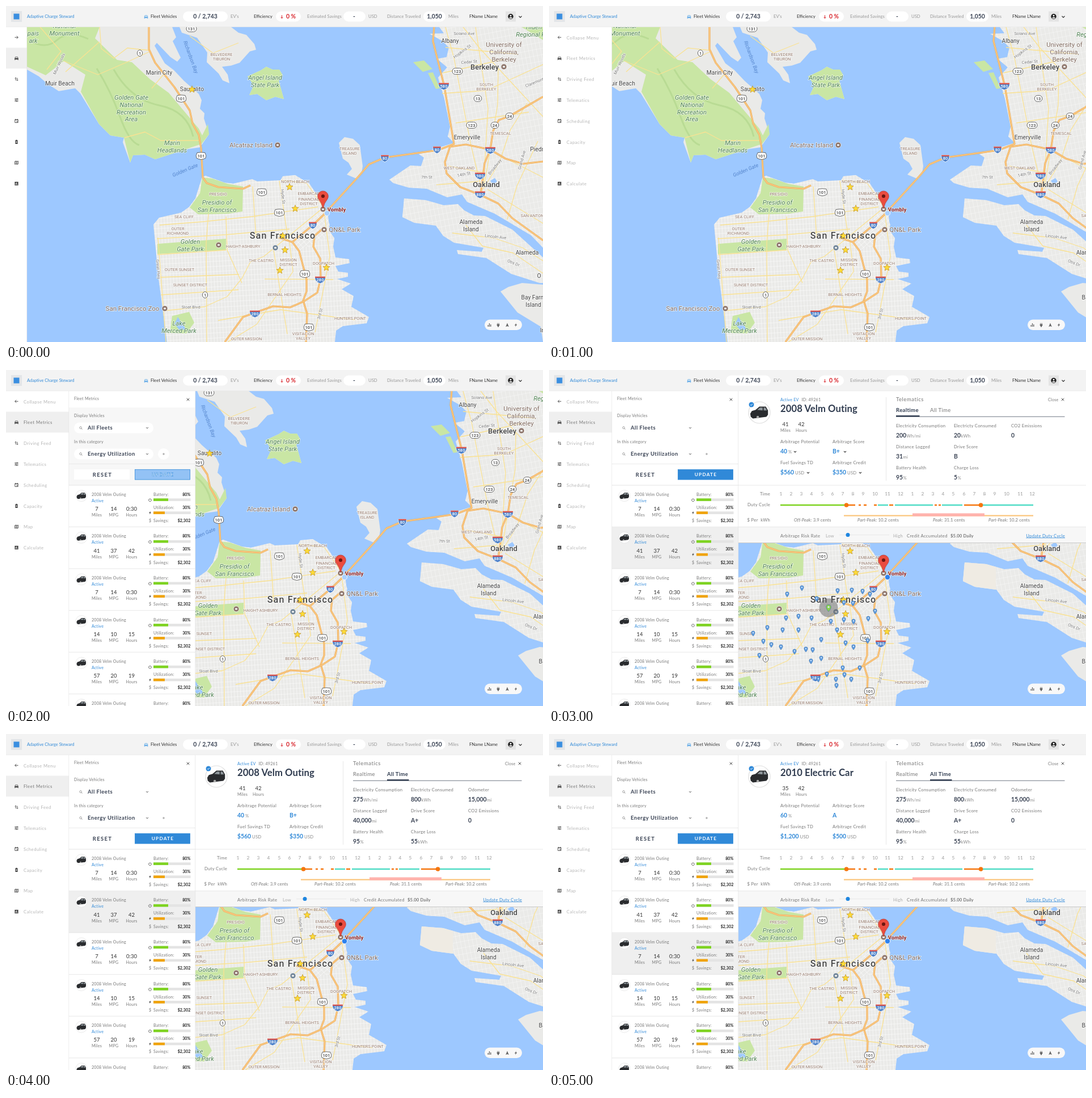
These frames come from a looping animation (947 by 592 pixels, 6000 ms). An HTML page:

```html
<!DOCTYPE html>
<html lang="en">
<head>
<meta charset="utf-8">
<title>Fleet dashboard</title>
<style>
html, body { margin: 0; width: 100%; height: 100%; overflow: hidden }
svg { display: block; width: 100vw; height: 100vh }
text { font: 7.7px Lato, sans-serif; letter-spacing: .3px; fill: #777; white-space: pre }
.mid { text-anchor: middle } .end { text-anchor: end }
.head { letter-spacing: 0; fill: #999 }
.dark { fill: #333 } .blue { fill: #3089d8 } .pale { fill: #aaa }
.card { font-size: 7.1px; letter-spacing: .25px }
.pct { font-size: 7.1px; letter-spacing: .1px; font-weight: 700; fill: #222 }
.num { font-size: 9.5px; letter-spacing: 0; fill: #333 }
.value { font-size: 10.4px; letter-spacing: 0; font-weight: 700; fill: #3a4354 }
.value tspan { font-size: 7.7px; font-weight: 400; fill: #888; letter-spacing: .2px }
.value.blue { fill: #3089d8 }
.name { font-size: 16.6px; letter-spacing: .1px; font-weight: 700; fill: #2f3b4f }
.field { font-size: 9.5px; letter-spacing: .5px; font-weight: 700; fill: #3a4354 }
.tab { font-size: 9.5px; letter-spacing: .35px }
.on { font-weight: 700; fill: #2f3b4f }
.nav { letter-spacing: .5px; fill: #b4b4b4 } .now { fill: #777 }
#map text { font-family: Roboto, sans-serif; letter-spacing: 0; text-anchor: middle; fill: #444;
  stroke: #fff; stroke-width: 1.6px; stroke-opacity: .75; paint-order: stroke }
#map .city { font-size: 13px; font-weight: 500 }
#map .metro { font-size: 16px; font-weight: 500; letter-spacing: 1.2px }
#map .town { font-size: 10.3px }
#map .place { font-size: 11.5px; fill: #806a5f }
#map .park { font-size: 11.3px; font-style: italic; fill: #4d8150 }
#map .area { font-size: 7.4px; fill: #94796b }
#map .road { font-size: 7.5px; fill: #777 }
#map .sea { font-size: 9px; font-style: italic; fill: #5585cc; stroke: none }
#map .sign { font-size: 7.5px; font-weight: 500; stroke: none }
#map .inter { fill: #fff }
#map .pinned { font-size: 9.6px; font-weight: 700; fill: #8f1f1b }
</style>
</head>
<body>
<svg viewBox="0 0 947 592" preserveAspectRatio="none"><g id="map"></g><g id="ui"></g></svg>
<script>
const $ = id => document.getElementById(id);
const text = (x, y, s, cls = '', style = '') => `<text x="${x}" y="${y}" class="${cls}" style="${style}">${s}</text>`;
const rect = (x, y, w, h, fill, more = '') => `<rect x="${x}" y="${y}" width="${w}" height="${h}" fill="${fill}" ${more}/>`;
const dot = (x, y, r, fill, more = '') => `<circle cx="${x}" cy="${y}" r="${r}" fill="${fill}" ${more}/>`;
const shape = (d, fill, more = '') => `<path d="${d}" fill="${fill}" ${more}/>`;
const line = (d, color, width = 1) => shape(d, 'none', `stroke="${color}" stroke-width="${width}" stroke-linejoin="round"`);
const at = (x, y, content, scale = 1) => `<g transform="translate(${x} ${y}) scale(${scale})">${content}</g>`;
const hline = (x1, x2, y, color, width) => line(`M${x1} ${y}H${x2}`, color, width);
const each = (list, draw) => list.map(draw).join('');

// ---- Map ----
const LAND = '#eaeae8', PARK = '#c9e6a4', WATER = '#9dc8ff';
const coast = {
  marin: 'M0 37V90L37 112 58 124 73 137 93 150 122 145 131 154 164 208 184 228 208 232 206 240 219 276 224 263 245 262 263 270 291 261 321 252 342 249 358 226 349 198 350 189 342 181 345 166 340 155 314 132 296 113 280 101 262 70 266 65 290 90 302 98 308 91 294 62 300 55 293 37Z',
  tiburon: 'M306 37L310 47 337 56 355 82 354 99 375 119 382 131 394 136 391 121 381 107 397 105 412 100 430 80 441 77 438 67 424 51 410 47 397 37Z',
  angel: 'M426 124L450 113 459 107 470 112 482 112 488 122 481 132 490 164 475 160 459 166 443 155 429 157 437 140Z',
  treasure: 'M587 241L597 231 612 234 624 245 629 282 627 295 620 305 601 297 610 287 604 276 594 269Z',
  city: 'M346 301L352 299 385 311 401 313 434 305 443 309 484 307 488 300 510 298 535 313 556 344 568 370 571 397 579 409 577 424 581 443 605 446 606 453 581 458 586 468 603 470 603 477 584 481 608 489 592 499 613 511 609 530 640 548 636 559 594 564 582 572 580 592H284L269 480 260 385 270 373 309 364 323 354 334 339Z',
  east: 'M764 37L772 48 747 49 770 62 781 73 777 90 760 93 778 108 762 126 773 163 783 213 779 230 790 241 728 261 737 267 732 282 713 281 676 306 683 312 710 320 742 322 778 337 804 332 813 345 862 366 904 391 926 404 947 426H1000V37Z',
  alameda: 'M702 339L740 342 772 351 797 349 808 360 825 369 845 370 893 394 947 443H1000V488H941L891 472 847 444 797 437 795 430 839 433 842 426 790 417 771 405 758 387 720 382 699 372Z',
  farm: 'M872 503L886 495 910 488 947 491H1000V592H947L943 565 902 540Z'
};
const parks = [
  'M0 37H165L157 57 196 95 222 99 254 129 287 153 340 216 346 228 356 208 358 226 345 243 291 261 263 270 245 262 224 263 219 276 208 232 184 228 164 208 132 151 140 121 102 97 70 122 0 90Z',
  'M346 302L364 304 390 313 418 318 417 362 392 366 339 367 324 355 342 330Z',
  'M267 419L388 410V430L267 437Z', 'M293 546L323 539 332 558 318 577 289 576Z',
  'M718 99L737 96 752 111 735 116Z', 'M744 118L753 117 765 145 758 146Z', 'M909 37H1000V91L961 82 947 60Z', coast.angel
];
const streets = [
  'M165 37L168 75 190 92 214 74 252 78M60 37L97 80 72 112M165 63L105 116M102 97L162 121 213 99 252 81M281 117L257 145M209 232L245 222 273 237 342 237M324 53L365 83 410 65',
  'M271 386L347 380 434 371 550 354M266 410L388 403 500 393M267 438L388 430M357 366L353 418 354 592M268 408L282 592M388 371L390 430 416 488M482 308L498 415M435 318L441 408',
  'M560 355L455 441 431 451 416 480 390 512 350 530 277 537M500 416L506 468 442 561 391 592M472 430L496 578M486 307L530 312 560 355 571 441 545 575M456 481L577 482M270 478L411 473M273 509L410 500M374 554L484 535 616 553',
  'M775 37L790 92 819 241 841 333M828 37L850 181 842 315M868 108L867 174 844 312M770 118L878 94M769 154L847 149 947 103M793 206L922 187M841 323L870 276 889 219 919 171M855 255L947 302M849 323L947 383M775 73L902 85',
  'M759 315L833 309M781 282L844 294M884 376L901 317 938 238M787 400L861 409 911 426 947 449M811 386L840 423 894 435 947 471M806 37L835 74 947 195'
];
const freeways = [
  'M252 37V76L263 100 297 143 324 184 329 207 340 227 344 250 347 302 354 312 374 319 418 322 431 316',
  'M560 368L622 300 640 279 668 267 762 254 790 243 773 142 753 62 755 37',
  'M560 368L541 386 505 416 517 432 530 481V503L524 519 531 542 529 592M505 416L481 408',
  'M560 391L544 405 542 424 554 445 555 479 549 505 526 520 501 531 471 529 440 540 418 548 386 592',
  'M783 248L811 244 854 253 881 269 912 278 947 274M854 253L844 277 837 332M783 248L774 275 777 295 801 319 837 333 868 348 893 374 947 413M854 253L859 220 869 201 888 194 947 160'
];

// Entries read "x y angle text"; "/" starts a new line and the angle may be left out.
const labels = {
  park: '221 165 Golden Gate/National/Recreation/Area|457 130 Angel Island/State Park|293 245 Marin/Headlands|372 350 Presidio of/San Francisco|325 419 Golden/Gate Park|305 563 Lake/Merced Park|103 39 National/Monument|48 52 pais/ark|930 41 Tilden/Regional Par',
  place: '432 249 Alcatraz Island|223 537 San Francisco Zoo|597 398 QN&amp;L Park|878 72 University of/California,/Berkeley',
  city: '847 319 Oakland|844 112 Berkeley',
  metro: '488 410 San Francisco',
  town: '783 65 Albany|813 235 Emeryville|270 121 Marin City|328 150 Sausalito|95 140 Muir Beach|820 384 Alameda/Island|919 438 Alameda|930 517 Bay Farm/Island|939 256 Piedm|940 479 O|946 575 In',
  area: '380 88 BELVEDERE/TIBURON|606 254 TREASURE/ISLAND|847 141 SOUTH/BERKELEY|799 288 WEST OAKLAND|872 227 TEMESCAL|510 312 NORTH BEACH|534 333 EMBARCAD|534 343 FINANCIAL/DISTRICT|374 334 PRESIDIO|314 374 SEA CLIFF|303 395 OUTER/RICHMOND|418 426 HAIGHT-ASHBURY|450 451 THE CASTRO|498 450 MISSION/DISTRICT|560 456 DOGPATCH|306 467 OUTER SUNSET|325 494 SUNSET DISTRICT|491 511 BERNAL HEIGHTS|607 553 HUNTERS POINT|524 580 VISITACION/VALLEY|424 589 OUTER MISSION|928 372 SAN ANTON',
  road: '326 533 Sloat Blvd|742 304 0 7th St|808 299 -12 14th St|486 336 84 Hyde St|266 464 85 Great Hwy|556 543 -75 3rd St|864 285 -52 Broadway|912 272 -75 Grand Ave|863 409 6 Lincoln Ave|894 455 22 Otis Dr|817 101 -5 Cedar St|806 82 -36 Hopkins St|933 137 -22 Claremont|808 51 Solano Ave|96 103 -65 Muir Woods',
  sea: '323 91 70 Richardson Bay|317 292 -23 Golden Gate'
};
const signs = {
  us: '309 163 101|344 264 101|451 328 101|482 364 101|527 472 101|534 566 101',
  state: '236 83 1|351 509 1|327 40 131|796 115 123|832 163 13|888 194 24|862 210 24|821 210 123',
  inter: '772 141 580|760 253 80|668 268 80|854 254 580|836 299 980|836 332 880|541 386 80|554 482 280|439 542 280'
};
const stars = [[328, 147], [500, 319], [510, 357], [488, 405], [492, 430], [483, 466], [565, 461]];

function label(cls, entry) {
  const [, x, y, angle = 0, words] = entry.match(/^(\d+) (\d+) (?:(-?\d+) )?(.*)$/);
  const gap = cls === 'area' ? 8.4 : 12.8;
  return at(x, y, `<g transform="rotate(${angle})">${each(words.split('/'), (s, i) => text(0, i * gap, s, cls))}</g>`);
}
function sign(kind, entry) {
  const [x, y, n] = entry.split(' '), w = n.length * 2.2 + 2.4, edge = 'stroke="#444" stroke-width=".8"';
  const plate = {
    us: shape('M-7-5.5L0-6.2 7-5.5Q10 0 8 4Q4 6 0 6.5Q-4 6-8 4Q-10 0-7-5.5Z', '#fff', edge),
    state: rect(-w, -5.5, 2 * w, 11, '#fff', 'rx="5.5" ' + edge),
    inter: shape(`M${-w}-5H${w}Q${w + 2} 3 0 7Q${-w - 2} 3 ${-w}-5Z`, '#4a7fc9', 'stroke="#fff" stroke-width=".8"')
      + rect(-w, -5.4, 2 * w, 2.4, '#d65650')
  };
  return at(x, y, plate[kind] + text(0, 2.9, n, 'sign ' + kind));
}
const star = ([x, y]) => shape('M' + Array.from({ length: 10 }, (_, i) => {
  const a = i * Math.PI / 5, r = i % 2 ? 2.8 : 6.4;
  return `${x + r * Math.sin(a)} ${y - r * Math.cos(a)}`;
}).join('L') + 'Z', '#ffdc35', 'stroke="#b88a25" stroke-width=".7"');
const poi = ([x, y, color = '#8b7267']) => dot(x, y, 5, color, 'stroke="#fff" stroke-width=".7"') + rect(x - 2, y - 1.5, 4, 3, '#eee');
const pattern = (id, w, h, angle) => `<pattern id="${id}" width="${w}" height="${h}" patternUnits="userSpaceOnUse" patternTransform="rotate(${angle})">${line(`M0 0H${w}M0 0V${h}`, '#fff')}</pattern>`;

function drawMap() {
  const downtown = 'M498 414L561 358 571 386 560 409 520 429Z';
  return pattern('blocks', 5.5, 9, -3) + pattern('slant', 8, 6, -42) + pattern('east', 7, 11, -11)
    + rect(0, 37, 1000, 555, WATER) + each(Object.values(coast), d => shape(d, LAND))
    + shape(coast.city, 'url(#blocks)') + shape(downtown, LAND) + shape(downtown, 'url(#slant)')
    + shape(coast.east + coast.alameda, 'url(#east)', 'opacity=".75"') + each(parks, d => shape(d, PARK))
    + line('M160 110Q185 150 201 195T235 245M190 112Q220 165 270 175T330 230M40 60Q70 78 90 60T145 58', '#b9db94', 3)
    + shape('M297 560L303 548 318 570 306 571ZM854 308L862 303 866 309 859 315Z', WATER)
    + each(streets, d => line(d, '#fae292', 1.3)) + each(freeways, d => line(d, '#eba650', 3.2) + line(d, '#f9c67f', 2.2))
    + '<g id="yard"></g>'
    + each(Object.entries(labels), ([cls, list]) => each(list.split('|'), e => label(cls, e)))
    + each(Object.entries(signs), ([kind, list]) => each(list.split('|'), e => sign(kind, e)))
    + each([[479, 245], [878, 107], [375, 421], [280, 533], [561, 394], [475, 426, '#6d8296'], [559, 358]], poi) + each(stars, star)
    + shape('M559 357Q557 347 551 340A9.3 9.3 0 1 1 567 340Q561 347 559 357Z', '#ea4c3f', 'stroke="#b2332b" stroke-width=".7"')
    + dot(559, 335, 3.1, '#6d1712') + text(583, 362, 'Vombly', 'pinned');
}

// ---- Interface ----
const BLUE = '#3089d8', RULE = '#e2e2e2', INK = '#444';
const bolt = 'M1-4L-2.5 .8H-.3L-1 4 2.5-1H.3Z';
const cross = (x, y) => at(x, y, line('M-2.3-2.3L2.3 2.3M2.3-2.3L-2.3 2.3', '#555'));
const chevron = (x, y, scale = 1) => at(x, y, line('M-2-1L0 1 2-1', '#444', 1.1), scale);
const carIcon = color => shape('M-2.4-3H2.4L3.6 0V3.5H2.4V2.5H-2.4V3.5H-3.6V0ZM-2-2L-2.5-.3H2.5L2-2Z', color, 'fill-rule="evenodd"');
const navIcons = [
  line('M-3.3 0H3M.3-2.8L3.1 0 .3 2.8', INK),
  carIcon(INK),
  line('M-1.6 2.5V-3M-3-1.6L-1.6-3-.2-1.6M1.6-2.5V3M.2 1.6L1.6 3 3 1.6', INK),
  line('M-3.5-2.5H3.5M-3.5 0H3.5M-3.5 2.5H3.5M1.5-3.6V-1.4M-1.5-1.1V1.1M.5 1.4V3.6', INK),
  line('M-3-2.5H3V3.2H-3ZM-3-2H3M-2-4V-2M2-4V-2', INK) + rect(.3, .4, 1.8, 1.8, INK),
  shape('M-2.3-3H-1V-4H1V-3H2.3V4H-2.3Z', INK) + at(0, .5, shape(bolt, '#fff'), .6),
  line('M-3.3-2.5L-1-3.2 1-2.5 3.3-3.2V2.5L1 3.2-1 2.5-3.3 3.2ZM-1-3.2V2.5M1-2.5V3.2', INK),
  rect(-3.5, -3.5, 7, 7, INK) + line('M-1.8 2V-.5M0 2V-2M1.8 2V.8', '#fff')
];
const navLabels = ['Collapse Menu', 'Fleet Metrics', 'Driving Feed', 'Telematics', 'Scheduling', 'Capacity', 'Map', 'Calculate'];
const avatar = (x, y, scale) => at(x, y, dot(0, 0, 10, '#fff', 'stroke="#ddd" stroke-width=".6"')
  + shape('M-8.5 1L-7-1.5-3.5-2.5 0-5.5 6-5.5 8-2 8 2 6.5 4-6 5.5-8 4Z', '#292b2e')
  + shape('M-2-2.5L.5-4.6H3V-2ZM4-4.6H5.6L7-2H4Z', '#8f979c') + dot(-1.5, 4.2, 1.2, '#aaa'), scale);

function header() {
  const pill = (x, w) => rect(x, 9.5, w, 18, '#fff', 'rx="9"');
  const note = (x, s, cls = '') => text(x, 21.2, s, 'head ' + cls);
  return rect(0, 0, 947, 37, '#f3f3f3') + hline(0, 947, 36.8, '#e4e4e4', .6)
    + rect(9, 9, 19, 19, '#e3e5e8') + rect(13.5, 13.5, 10, 10, '#3b8fe0')
    + text(37, 21, 'Adaptive Charge Steward', 'head blue', 'font-size:7.5px')
    + at(247, 19, carIcon('#6aaee8'), .9) + note(255, 'Fleet Vehicles', 'dark')
    + pill(312, 79) + text(351.5, 22.3, '0 / 2,743', 'value mid') + note(396, "EV's") + note(437, 'Efficiency', 'dark')
    + pill(476, 44) + at(486.5, 19, line('M0-2.8V2.8M-2 .8L0 2.8 2 .8', '#d8232a')) + text(494, 22.3, '0 %', 'value', 'fill:#d8232a')
    + note(531, 'Estimated Savings') + pill(595, 39) + text(614, 22.3, '-', 'value mid') + note(639, 'USD')
    + note(672, 'Distance Traveled') + pill(736, 39) + text(755.5, 22.3, '1,050', 'value mid') + note(780, 'Miles')
    + note(817, 'FName LName', 'dark') + rect(881, 9.5, 18, 18, '#e4e4e4') + dot(890, 18.5, 4.7, '#222')
    + dot(890, 17, 1.5, '#fff') + shape('M887 21Q890 18.5 893 21Q890 23.5 887 21Z', '#fff') + chevron(907, 19, 1.25);
}

function sidebar(step) {
  const width = step ? 111 : 37;
  return rect(0, 37, width, 555, '#fff') + (step === 1 ? '' : rect(0, 73.5, width, 36.8, '#efefef'))
    + line(`M${width - .3} 37V592`, RULE, .6)
    + each(navIcons, (icon, i) => {
      const y = 55.3 + 36.8 * i;
      return at(18.5, y, step && !i ? `<g transform="scale(-1 1)">${icon}</g>` : icon, .9)
        + (step ? text(31, y + 3.2, navLabels[i], 'nav' + (step > 1 && i === 1 ? ' now' : '')) : '');
    });
}

const cards = [[7, 14, '0:30'], [41, 37, 42], [7, 14, '0:30'], [14, 10, 15], [57, 20, 19], [7, 14, '0:30']];
function card(stats, i, active) {
  const columns = ['Miles', 'MPG', 'Hours'], centers = [160, 190, 221.5];
  const meter = (y, name, pct, w, color) => text(260, y, name, 'card') + text(325.5, y, pct, 'pct end')
    + rect(260, y + 4.5, 65.5, 4.6, '#e4e4e4') + rect(260, y + 4.5, w, 4.6, color);
  return at(0, 203 + 73.6 * i, (active ? rect(111, 0, 223, 73.6, '#efefef') : '')
    + hline(111, 334, 73.4, '#dedede', .7) + avatar(133, 18.7, 1)
    + text(151, 18.8, '2008 Velm Outing', 'card') + text(151, 29.8, 'Active', 'card blue')
    + each(stats, (n, k) => text(centers[k], 45, n, 'num mid') + text(centers[k], 55, columns[k], 'card mid'))
    + meter(18.8, 'Battery:', '80%', 26, '#7ed321') + meter(41.8, 'Utilization:', '30%', 20, '#f0a30a')
    + at(254, 26, line('M-1.3-2A2.5 2.5 0 1 0 1.3-2M0-3V0', '#555', .8)) + at(254, 48.5, shape(bolt, INK), .75)
    + text(252, 65, '$', 'card') + text(260, 65, 'Savings:', 'card') + text(325.5, 65, '$2,302', 'pct end'));
}

function panel(step) {
  const busy = step === 2, active = step === 5 ? 2 : step > 2 ? 1 : -1;
  const box = (x, y, w, h, r) => busy ? rect(x, y, w, h, '#fff', `rx="${r}"`) : '';
  const field = (y, title, value) => text(120, y - 19, title, 'card') + box(120, y - 9.5, 140, 19, 9.5)
    + at(132, y, line('M1 1L2.6 2.6M1.4-.4A1.8 1.8 0 1 0 1.4-.3', '#777', .8))
    + text(144, y + 3.3, value, 'field') + chevron(249, y, .9);
  return rect(111, 37, 223, 555, '#fff') + (busy ? rect(111, 66, 223, 137, '#f7f7f7') : '')
    + text(120, 53, 'Fleet Metrics', 'card') + cross(321, 52)
    + field(102, 'Display Vehicles', 'All Fleets') + field(148, 'In this category', 'Energy Utilization')
    + box(268, 138, 20, 20, 10) + at(278, 148, line('M-2 0H2M0-2V2', '#888', .8))
    + hline(111, 334, 165.5, '#e6e6e6', .8) + box(120, 175, 98, 18, 0)
    + text(170, 188, 'RESET', 'field mid', 'letter-spacing:1.3px')
    + rect(227.5, 175.3, 97, 17.8, busy ? '#93c2f5' : BLUE, `stroke="${BLUE}" stroke-width=".8"`)
    + text(276.5, 187, 'UPDATE', 'field mid', 'font-size:8.3px;letter-spacing:1.2px;fill:#fff' + (busy ? ';stroke:#3089d8;stroke-width:.45px' : ''))
    + hline(111, 334, 203, '#dedede', .8) + each(cards, (stats, i) => card(stats, i, i === active)) + line('M333.7 37V592', RULE, .7);
}

const metric = (x, y, name, value, unit, cls = '') => text(x, y, name)
  + text(x, y + 18.3, `${value}<tspan dx="${cls ? 2 : .5}">${unit}</tspan>`, 'value ' + cls);

function vehicle(step) {
  const [name, miles, potential, score, savings, credit] = step === 5
    ? ['2010 Electric Car', 35, 60, 'A', '$1,200', '$500'] : ['2008 Velm Outing', 41, 40, 'B+', '$560', '$350'];
  const stat = (x, n, unit) => text(x, 99, n, 'num mid') + text(x, 109, unit, 'card mid');
  return avatar(371, 75, 1.9) + dot(357, 61, 4.5, BLUE) + at(357, 61, line('M-2 0L-.5 1.5 2-1.3', '#fff'))
    + text(408, 55, 'Active EV', 'card blue') + text(445.5, 55, 'ID: 49261', 'card') + text(408, 74, name, 'name')
    + stat(417, miles, 'Miles') + stat(445, 42, 'Hours')
    + metric(408, 129, 'Arbitrage Potential', potential, '%', 'blue') + metric(500, 129, 'Arbitrage Score', score, '', 'blue')
    + metric(408, 166, 'Fuel Savings TD', savings, 'USD', 'blue') + metric(500, 166, 'Arbitrage Credit', credit, 'USD', 'blue')
    + (step === 3 ? chevron(434, 144) + chevron(522, 144) + chevron(457, 181) + chevron(549, 181) : '');
}

function telematics(step) {
  const now = step === 3, pick = (a, b) => now ? a : b;
  return line('M594.5 48V195', RULE, .8) + text(612, 55, 'Telematics', 'tab', 'letter-spacing:.55px')
    + text(880, 55, 'Close', 'card') + cross(906, 52)
    + text(612, 74, 'Realtime', 'tab ' + pick('on', '')) + text(672, 74, 'All Time', 'tab ' + pick('', 'on'))
    + hline(612, 909.5, 82.2, '#4a5362', .8) + hline(pick(612, 672), pick(653.5, 710.5), 81.2, '#2f3b4f', 2.2)
    + metric(612, 101, 'Electricity Consumption', pick(200, 275), 'Wh/mi') + metric(714, 101, 'Electricty Consumed', pick(20, 800), 'kWh')
    + (now ? '' : metric(815, 101, 'Odometer', '15,000', 'mi')) + metric(815, pick(101, 138), 'CO2 Emissions', 0, '')
    + metric(612, 138, 'Distance Logged', pick(31, '40,000'), 'mi') + metric(714, 138, 'Drive Score', pick('B', 'A+'), '')
    + metric(612, 175, 'Battery Health', 95, '%') + metric(714, 175, 'Charge Loss', pick(5, 55), pick('%', 'kWh'));
}

const hours = [409, 427, 445, 463, 482, 500, 518, 536, 554, 575, 597, 620, 641, 659, 677, 695, 713, 732, 750, 768, 786, 807, 831, 852];
function dutyCycle(step) {
  const orange = '#f5760f', teal = '#50dcc6';
  const span = (color, ...pairs) => each(pairs, ([a, b]) => hline(a, b, 238, color, 2.5));
  const price = (x, name, cents) => text(x, 267, `<tspan font-style="italic">${name}:</tspan> ${cents} cents`, '', 'letter-spacing:.12px');
  return hline(334, 947, 203, RULE, .8) + text(390, 221, 'Time', 'end') + text(390, 240, 'Duty Cycle', 'end') + text(390, 267, '$ Per  kWh', 'end')
    + each(hours, (x, i) => text(x, 221, i % 12 + 1, 'mid head', 'font-size:8.3px'))
    + span('#7ed321', [408, 524]) + span(teal, [580, 598], [610, 677], [693, 729], [765, 854])
    + span(orange, [527, 540], [546, 550], [555, 560], [573, 578], [600, 607], [732, 758])
    + (step === 5 ? span(teal, [677, 693]) : span(orange, [680, 684], [687, 691]))
    + dot(524.5, 238, 3.8, orange) + dot(761.5, 238, 3.8, orange)
    + hline(520, 854, 256.6, '#fbc67e', 2.2) + rect(641, 252.5, 127, 5.2, '#ffb3ad')
    + price(432, 'Off-Peak', '3.9') + price(544, 'Part-Peak', '10.2') + price(677, 'Peak', '31.1') + price(775, 'Part-Peak', '10.2');
}

const riskRow = () => rect(334, 276.5, 613, 28, '#f7f7f7') + hline(334, 947, 276.5, RULE, .8) + hline(334, 947, 304.5, '#c9c9c9')
  + text(408, 294.5, 'Arbitrage Risk Rate') + text(488, 294.5, 'Low', 'pale') + hline(512, 600, 290.5, '#ececec', 1.5)
  + dot(527, 290.5, 3.5, '#1f86e0') + text(607, 294.5, 'High', 'pale') + text(631, 294.5, 'Credit Accumulated')
  + text(708, 294.5, '$5.00 Daily', '', 'font-weight:700;letter-spacing:.15px')
  + text(910, 294.5, 'Update Duty Cycle', 'end blue', 'text-decoration:underline');

const pinSpots = '420 395,446 384,472 403,509 389,534 388,553 390,536 411,566 395,440 434,463 437,418 437,385 454,360 464,378 478,392 484,371 503,409 488,433 496,453 492,465 493,412 458,440 458,480 475,497 443,520 440,508 458,537 443,563 438,575 425,523 481,537 488,562 477,480 508,462 513,490 536,521 537,506 545,548 525,518 525,533 545,475 545,507 556,520 410';
const pin = (x, y, color, scale = 1) => at(x, y, shape('M0 5Q-3.2 1-3.2-1A3.2 3.2 0 1 1 3.2-1Q3.2 1 0 5Z', color, 'stroke="#47729f" stroke-width=".5"')
  + dot(0, -1, 1.2, '#d7e8fa'), scale);
const fleetPins = () => each(pinSpots.split(','), spot => pin(...spot.split(' '), '#5b9ae0'))
  + dot(493, 419, 16.5, '#666', 'opacity=".5"') + pin(493, 419, '#8ad34d', 1.35);

const toolbar = () => rect(844, 552.5, 66, 18.5, '#f8f8f8', 'rx="9.2"')
  + at(852.5, 562, line('M-2.3 3V0M0 3V-3M2.3 3V-1', '#666', 1.3))
  + at(868, 562, shape('M-2.3-1.5H-1.5V-3.5H-.7V-1.5H.7V-3.5H1.5V-1.5H2.3V1L1 2.2V3.5H-1V2.2L-2.3 1Z', '#666'))
  + at(884, 562, shape('M0-3.5L2.8 3.2 0 2-2.8 3.2Z', '#666')) + at(899, 562, shape(bolt, '#666'), .9);

function drawUi(step) {
  const open = step > 2;
  return dot(step ? 597 : 566, 365, 4.7, open ? '#2f82ee' : '#a9d0ff', 'stroke="#f0f6ff"') + (step === 3 ? fleetPins() : '')
    + (open ? rect(334, 37, 613, 268, '#fff') + vehicle(step) + telematics(step) + dutyCycle(step) + riskRow() : '')
    + (step > 1 ? panel(step) : '') + sidebar(step) + header() + toolbar();
}

$('map').innerHTML = drawMap();
const start = performance.now();
let shown = -1;
function frame() {
  const step = Math.floor((performance.now() - start) % 6000 / 1000);
  if (step !== shown) {
    shown = step;
    $('map').setAttribute('transform', `translate(${step ? 31 : 0} 0)`);
    $('yard').innerHTML = step > 2 ? shape('M702 339L740 342 757 347V387L720 382 699 372Z', '#efebe3') : '';
    $('ui').innerHTML = drawUi(step);
  }
  requestAnimationFrame(frame);
}
frame();
</script>
</body>
</html>
```
